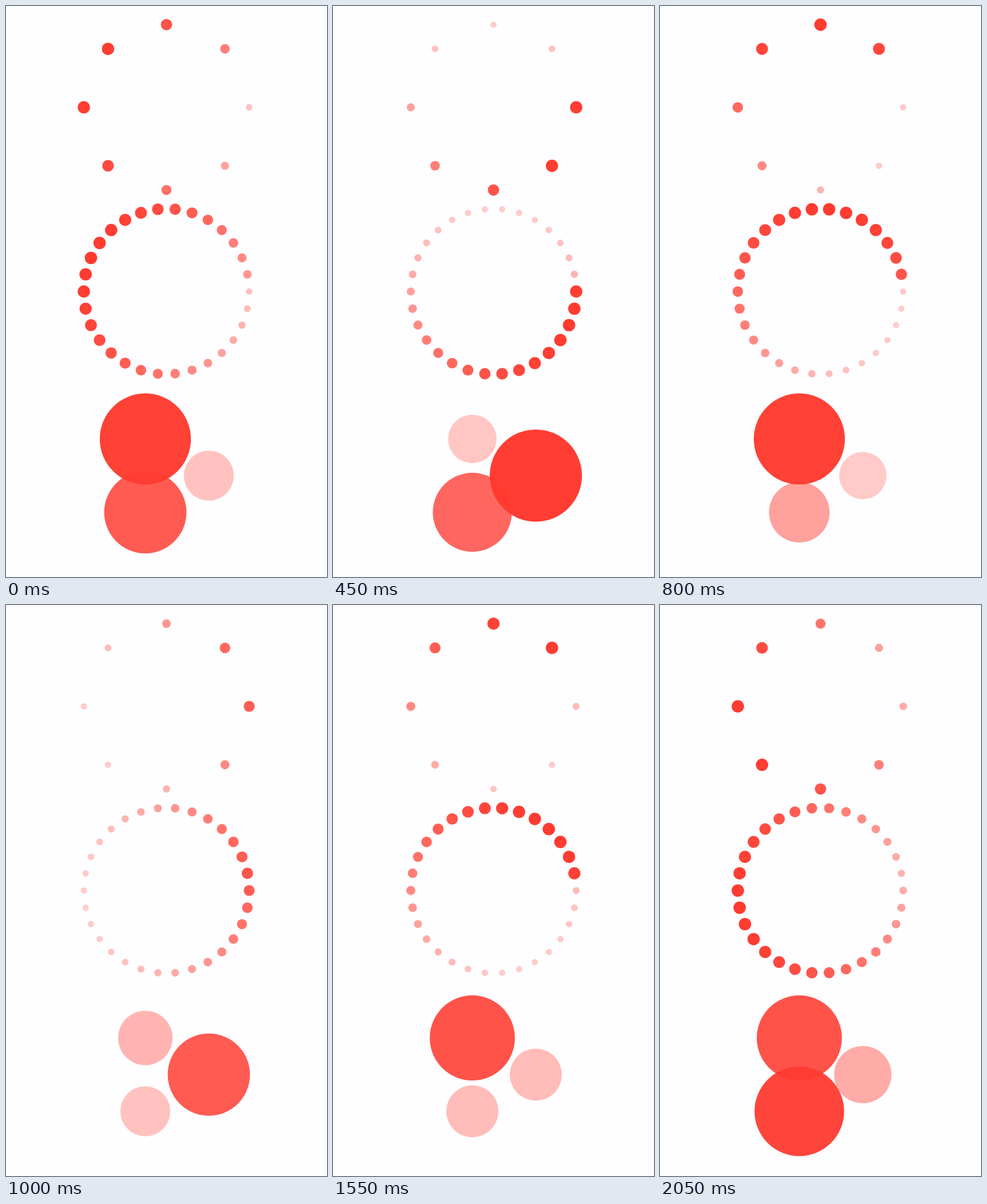
Recreate the animation shown at these times as an HTML page with a canvas. Size 561 by 998 pixels, loop 2100 ms.

```html
<!DOCTYPE html>
<html lang="en">
<head>
<meta charset="utf-8">
<title>Pulsing dots</title>
<style>
  html, body { margin: 0; width: 100%; height: 100%; overflow: hidden; background: #fefdff; }
  canvas { display: block; width: 561px; height: 998px; }
</style>
</head>
<body>
<canvas id="stage"></canvas>
<script>
const W = 561, H = 998;
const TICK = 1000 / 60;   // delays snap to display ticks
const HALF = 350;         // one way, small to large
const SPREAD = 30;        // ticks between first dot and a full turn
const START = 4 * TICK;   // when the first dot is smallest
const STEP = 50;
const LOOP = 2100;

const rings = [
  { count: 8,  y: 177.1, radius: 144.5, dot: 10.85 },
  { count: 30, y: 499,   radius: 144.5, dot: 10.85 },
  { count: 3,  y: 820.8, radius: 74,    dot: 81.3 }
];

const canvas = document.getElementById('stage');
const ctx = canvas.getContext('2d');
const dpr = window.devicePixelRatio || 1;
canvas.width = Math.round(W * dpr);
canvas.height = Math.round(H * dpr);
ctx.scale(dpr, dpr);

// cubic-bezier(0.42, 0, 0.58, 1)
function easeInOut(x) {
  let lo = 0, hi = 1;
  for (let i = 0; i < 24; i++) {
    const s = (lo + hi) / 2, q = 1 - s;
    if (1.26 * s * q * q + 1.74 * s * s * q + s * s * s < x) lo = s;
    else hi = s;
  }
  return lo * lo * (3 - 2 * lo);
}

// 0 when smallest, 1 when largest
function pulse(t) {
  const period = 2 * HALF;
  const p = ((t % period) + period) % period;
  return easeInOut(p < HALF ? p / HALF : 2 - p / HALF);
}

function drawRing({ count, y, radius, dot }, t) {
  for (let i = 0; i < count; i++) {
    const delay = Math.ceil(i * SPREAD / count) * TICK;
    const k = pulse(t - START - delay);
    const angle = i / count * 2 * Math.PI;
    ctx.globalAlpha = 0.25 + 0.75 * k;
    ctx.beginPath();
    ctx.arc(W / 2 + radius * Math.cos(angle), y + radius * Math.sin(angle),
            dot * (0.5 + 0.5 * k), 0, 2 * Math.PI);
    ctx.fill();
  }
}

function draw(t) {
  ctx.globalAlpha = 1;
  ctx.fillStyle = '#fefdff';
  ctx.fillRect(0, 0, W, H);
  ctx.fillStyle = '#ff3b30';
  rings.forEach(ring => drawRing(ring, t));
}

const begin = performance.now();
function frame() {
  const t = (performance.now() - begin) % LOOP;
  draw(Math.floor(t / STEP) * STEP);
  requestAnimationFrame(frame);
}
frame();
</script>
</body>
</html>
```
